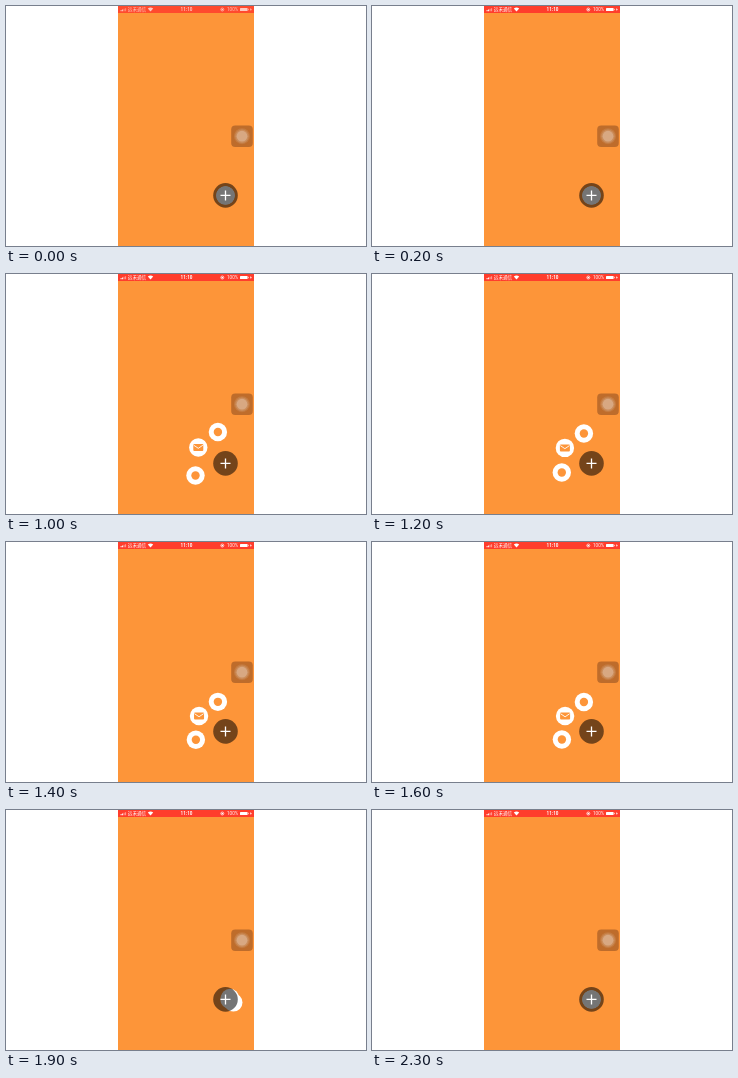
These frames come from a looping animation (360x240 px, 2400 ms). An HTML page:

```html
<!DOCTYPE html>
<html lang="en">
<head>
<meta charset="utf-8">
<title>Radial menu</title>
<style>
  html, body { margin: 0; width: 100%; height: 100%; overflow: hidden; background: #fff; }
  svg { display: block; width: 360px; height: 240px; }
  text { font: 4.6px "Noto Sans CJK SC", "Noto Sans CJK", Roboto, sans-serif; }
  .clock, .level { font-family: Roboto, Arial, sans-serif; }
  .clock { font-weight: 700; }
</style>
</head>
<body>
<svg viewBox="0 0 360 240">
  <rect x="112" width="136" height="240" fill="#fd9539"/>
  <rect id="bar" x="112" width="136" height="7" fill="#ff3d2c"/>

  <g id="status" fill="#fff">
    <path d="M114.6 5.2v-1.2h1v1.2zM116.1 5.2v-1.8h1v1.8z"/>
    <path d="M117.6 5.2v-2.4h1v2.4zM119.1 5.2v-3h1v3z" opacity=".5"/>
    <text x="121.8" y="5.2">远禾通信</text>
    <path d="M144.5 5.5L141.8 2.5Q144.5 .5 147.2 2.5z"/>
    <text class="clock" x="180.5" y="5.1" text-anchor="middle">11:10</text>
    <circle cx="216.3" cy="3.5" r="1.5" fill="none" stroke="#fff" stroke-width=".7"/>
    <rect x="215.6" y="3" width="1.4" height="1.2"/>
    <text class="level" x="221" y="5.1">100%</text>
    <rect x="234" y="1.9" width="7.6" height="3.2" rx=".6"/>
    <rect x="242" y="2.8" width=".6" height="1.4"/>
    <path d="M245.1 1.7l-1.2 2h.9l-.3 1.6 1.4-2.1h-.9z"/>
  </g>

  <g class="item">
    <circle r="9.2" fill="#fff"/>
    <circle class="glyph" r="4.2" fill="#fd9539"/>
  </g>
  <g class="item">
    <circle r="9.2" fill="#fff"/>
    <g class="glyph">
      <rect x="-5" y="-3.5" width="10" height="7" rx="1" fill="#fd9539"/>
      <path d="M-4.6-2.3L0 .8 4.6-2.3" fill="none" stroke="#fff" stroke-width=".9"/>
    </g>
  </g>
  <g class="item">
    <circle r="9.2" fill="#fff"/>
    <circle class="glyph" r="4.2" fill="#fd9539"/>
  </g>

  <g transform="translate(219.5 189.4)">
    <circle r="12.3" fill="#000" opacity=".54"/>
    <path d="M-5 0H5M0-5V5" stroke="#fff" stroke-width="1.3"/>
  </g>

  <g transform="translate(236 130.2)">
    <rect x="-10.8" y="-10.7" width="21.6" height="21.4" rx="4" fill="#be6c2b"/>
    <g fill="#fff">
      <circle r="8" opacity=".1"/>
      <circle r="6.7" opacity=".14"/>
      <circle r="5.4" opacity=".24"/>
    </g>
  </g>
</svg>
<script>
const LOOP = 2400, STEP = 100;
const center = [219.5, 189.4];

// Offsets from the button: open place, extra when opening, recoil when closing
const items = [
  { open: [-7.6, -29.4], extra: [0, -2], recoil: [4, 0] },
  { open: [-26.4, -15.4], extra: [-.8, -.5], recoil: [7.8, 3] },
  { open: [-29.6, 8.1], extra: [-.4, 4], recoil: [4.5, -1.5] }
];

// Tracks of [time, value]
const spread = [[700, 0], [800, .09], [900, .7], [1000, 1], [1700, 1], [1800, .5], [1900, 0]];
const bounce = [[900, 0], [1000, 1], [1100, .5], [1200, .25], [1300, .12], [1600, 0]];
const kick = [[1800, 0], [1900, 1], [2000, -.3], [2100, .12], [2200, -.04], [2300, 0]];

function valueAt(track, t) {
  const i = track.findIndex(key => key[0] >= t);
  if (i === 0) return track[0][1];
  if (i < 0) return track[track.length - 1][1];
  const [t0, v0] = track[i - 1], [t1, v1] = track[i];
  return v0 + (v1 - v0) * (t - t0) / (t1 - t0);
}

const nodes = document.querySelectorAll('.item');
const bar = document.getElementById('bar');
const statusBar = document.getElementById('status');

function draw(now) {
  const t = Math.floor(now % LOOP / STEP) * STEP;
  const p = valueAt(spread, t), b = valueAt(bounce, t), k = valueAt(kick, t);
  items.forEach((item, i) => {
    const [x, y] = center.map((c, axis) =>
      c + p * item.open[axis] + b * item.extra[axis] + k * item.recoil[axis]);
    nodes[i].setAttribute('transform', `translate(${x} ${y})`);
    nodes[i].querySelector('.glyph').style.opacity = p > .3 ? 1 : 0;
  });
  bar.setAttribute('fill', t < 100 ? '#ff4a2e' : '#ff3d2c');
  statusBar.style.opacity = t < 100 ? .7 : t < 200 ? .85 : 1;
}

const start = performance.now();
function tick() {
  draw(performance.now() - start);
  requestAnimationFrame(tick);
}
tick();
</script>
</body>
</html>
```
